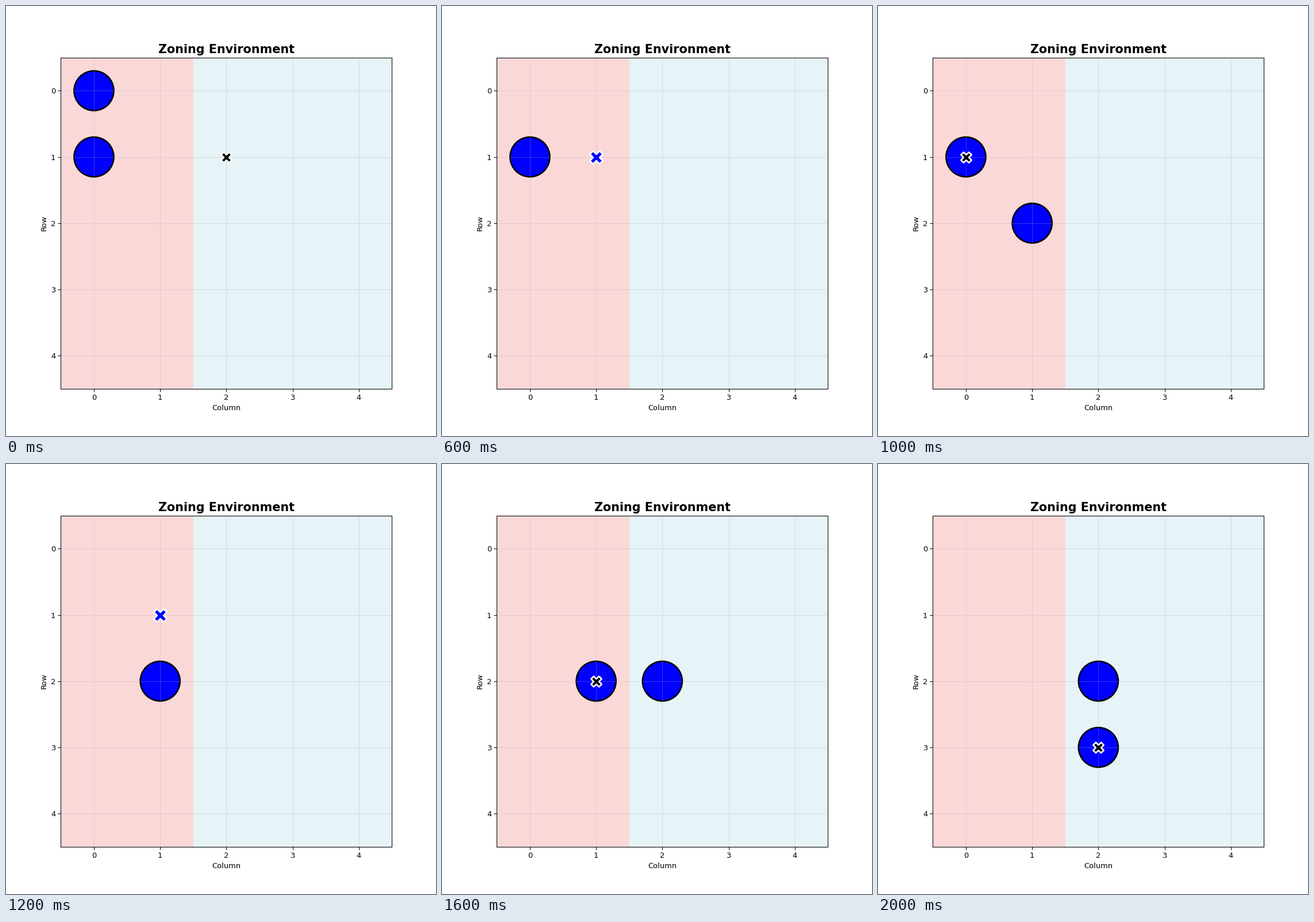
A matplotlib script for the animation above (2.1 s loop, 748 by 748 pixels).

```python
import matplotlib.pyplot as plt
from matplotlib.animation import FuncAnimation
from matplotlib.patches import Circle, Rectangle

SIZE = 5
STEP_MS = 100
START = (2, 1)  # (column, row)
DISCS = [(0, 0), (0, 1)]
MOVES = {"U": (0, -1), "D": (0, 1), "L": (-1, 0), "R": (1, 0)}
# P picks up the disc under the agent, or puts down the carried one
PLAN = "ULLP" "RDDP" "ULP" "RRDP" "LP" "DRP"


def rollout():
    """Return (agent, discs on the floor, carrying) before and after each action."""
    agent, discs, carrying = START, set(DISCS), False
    states = [(agent, sorted(discs), carrying)]
    for action in PLAN:
        if action == "P":
            discs ^= {agent}
            carrying = not carrying
        else:
            dx, dy = MOVES[action]
            agent = (agent[0] + dx, agent[1] + dy)
        states.append((agent, sorted(discs), carrying))
    return states


def add_zone(first, last, color):
    ax.add_patch(Rectangle((first - 0.5, -0.5), last - first + 1, SIZE,
                           facecolor=color, alpha=0.3, linewidth=0, zorder=0))


fig, ax = plt.subplots(figsize=(8, 8), dpi=93.5)
ax.set_xlim(-0.5, SIZE - 0.5)
ax.set_ylim(SIZE - 0.5, -0.5)
ax.set_aspect("equal")
ax.set_xticks(range(SIZE))
ax.set_yticks(range(SIZE))
ax.set_xlabel("Column")
ax.set_ylabel("Row")
ax.set_title("Zoning Environment", fontsize=16, fontweight="bold")
ax.grid(True, alpha=0.3)

add_zone(0, 1, "lightcoral")
add_zone(2, SIZE - 1, "lightblue")

circles = [ax.add_patch(Circle(pos, 0.3, facecolor="blue", edgecolor="black",
                               linewidth=2, zorder=1)) for pos in DISCS]
marker = ax.scatter(*START, s=200, marker="X", c="black", edgecolors="white",
                    linewidths=2, zorder=10)

states = rollout()


def draw(i):
    agent, discs, carrying = states[i]
    for k, circle in enumerate(circles):
        circle.set_visible(k < len(discs))
        if k < len(discs):
            circle.center = discs[k]
    marker.set_offsets([agent])
    marker.set_facecolor("blue" if carrying else "black")
    marker.set_sizes([300 if carrying else 200], fig.dpi)
    return [*circles, marker]


anim = FuncAnimation(fig, draw, frames=len(states), interval=STEP_MS,
                     repeat=True, repeat_delay=0, blit=False)
plt.show()
```
